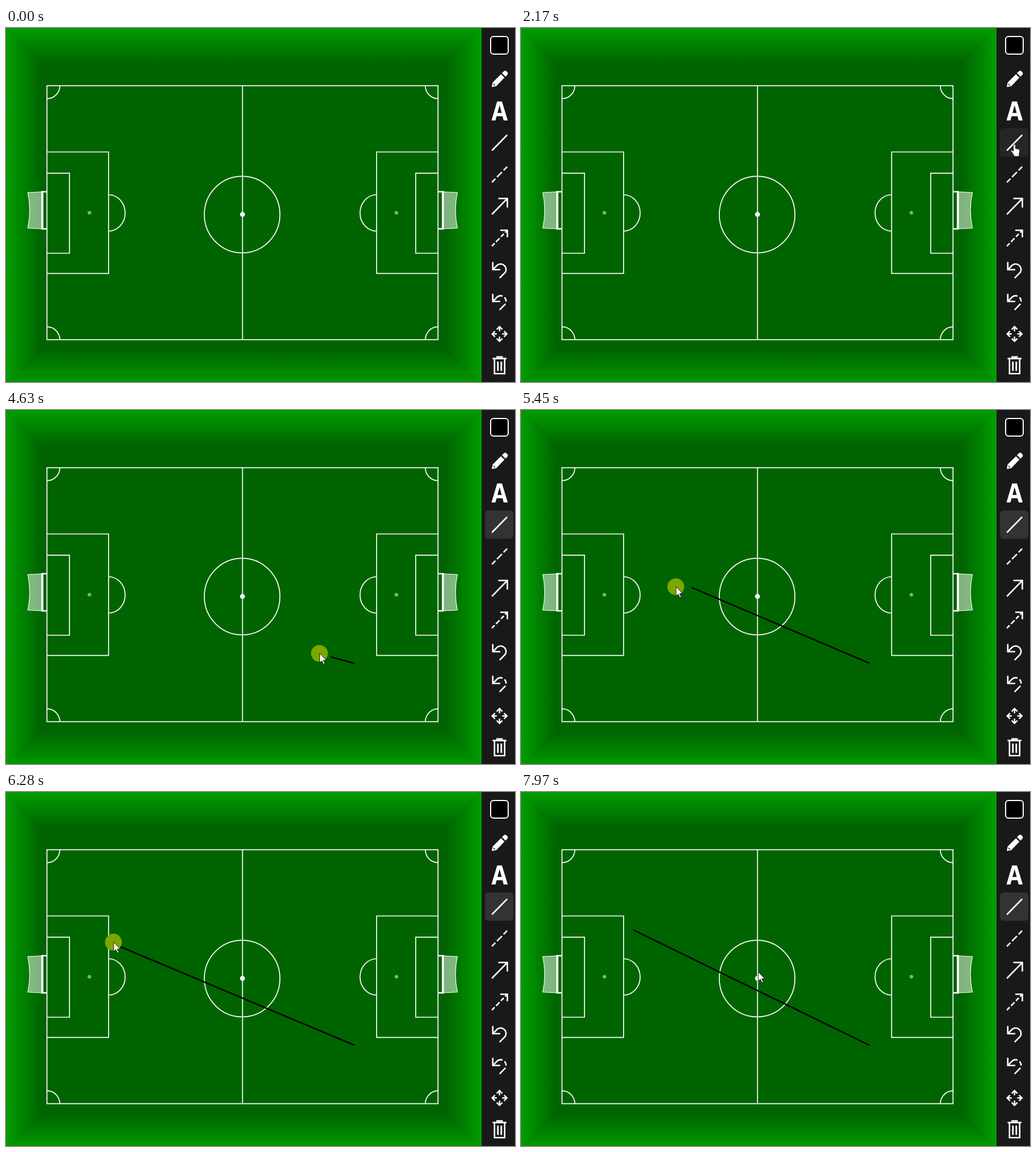
Animation of 898 by 624 pixels, one loop 8000 ms. Source, as an HTML page:

```html
<!DOCTYPE html>
<html lang="en">
<head>
<meta charset="utf-8">
<title>Tactics board</title>
<style>
  html, body { margin: 0; width: 100%; height: 100%; overflow: hidden; background: #1a191a; }
  svg { display: block; width: 898px; height: 624px; }
  .pitch { fill: none; stroke: #fff; stroke-width: 1.7; }
  .icons { fill: none; stroke: #fff; stroke-width: 2.6; }
  .solid { fill: #fff; stroke: none; }
</style>
</head>
<body>
<svg viewBox="0 0 898 624">
  <defs>
    <linearGradient id="fade" x2="0" y2="1">
      <stop stop-color="#009e00"/>
      <stop offset="1" stop-color="#006400"/>
    </linearGradient>
  </defs>
  <rect width="839" height="624" fill="#006400"/>
  <g fill="url(#fade)">
    <path id="long" d="M0 0H839L777 62H62Z"/>
    <use href="#long" transform="translate(0 630) scale(1 -1)"/>
    <path id="short" d="M0 0H630L568 62H62Z" transform="matrix(0 1 1 0 0 0)"/>
    <use href="#short" transform="translate(839 0) scale(-1 1)"/>
  </g>
  <rect x="839" width="59" height="624" fill="#1a191a"/>

  <g class="pitch">
    <rect x="72.3" y="101.7" width="689.9" height="447.7"/>
    <path d="M417.3 101.7V549.4"/>
    <ellipse cx="416.6" cy="328.8" rx="66.7" ry="67.5"/>
    <circle class="solid" cx="417.2" cy="328.6" r="4.3"/>
    <g id="half">
      <path d="M72.3 218.5H181V432.7H72.3M72.3 255.9H112V397H72.3"/>
      <path d="M181 294A29.2 32 0 0 1 181 358"/>
      <path d="M95 101.7A22.8 23 0 0 1 72.3 124.7M72.3 526.7A22.8 23 0 0 1 95 549.4"/>
      <path d="M38.4 290L63 288.8V354L38.4 352.8Q45.2 321 38.4 290Z"
            fill="#fff" fill-opacity=".5" stroke-width="1.1"/>
      <path d="M72.3 288.6H64V354H72.3" stroke-width="2.4"/>
      <path d="M64.2 287.4V355.2" stroke-width="3.4"/>
    </g>
    <use href="#half" transform="translate(834.8 0) scale(-1 1)"/>
    <g class="solid" opacity=".5">
      <circle cx="147.2" cy="325.6" r="3.2"/>
      <circle cx="688.7" cy="325.6" r="3.2"/>
    </g>
  </g>

  <rect id="button" x="845" width="50" height="50" rx="6"/>

  <g class="icons">
    <rect x="855" y="15" width="31" height="31" rx="5" fill="#000" stroke-width="2"/>
    <path class="solid" d="M857 104L858.6 96L873.2 81.4L879.4 87.6L865 102.4ZM875 79.6L878.4 76.2Q880.6 74.2 882.6 76L884.8 78.200Q886.4 80.200 884.600 82.400L881.2 85.800Z"/>
    <path d="M860 98.500L862.700 101.200" stroke="#1a191a" stroke-width="1.4"/>
    <path class="solid" fill-rule="evenodd" d="M856.500 163L866.500 129.500H875L885.200 163H878L876 155.600H865.500L863.500 163ZM867.100 149.800H874.500L870.800 136Z"/>
    <path d="M857.200 216L884.200 188.500"/>
    <path d="M857.200 272L884.200 244.500" stroke-dasharray="9 4 12.500 4"/>
    <path d="M857.200 328.500L884.500 300.500M868.500 300.500H884.500V316.500"/>
    <path d="M857.200 384.500L884 357" stroke-dasharray="7 3.500 9 3.500"/>
    <path d="M872 356.500H884.500V369"/>
    <g id="undo">
      <path d="M858.800 412.500V426H872"/>
    </g>
    <use href="#undo" y="56"/>
    <path id="bend" d="M859.500 425.300L867 417.800A9.600 9.600 0 0 1 880.400 431.200L870.800 440.800"/>
    <path d="M859.500 481.300L867 473.800A9.600 9.600 0 0 1 880.400 487.200L870.800 496.800" stroke-dasharray="20 4 8 4"/>
    <path id="arm" d="M870.700 534.500V527M865.700 531.300L870.700 526.300L875.700 531.300" stroke-width="2.500"/>
    <use href="#arm" transform="rotate(90 870.700 539.300)"/>
    <use href="#arm" transform="rotate(180 870.700 539.300)"/>
    <use href="#arm" transform="rotate(270 870.700 539.300)"/>
    <path d="M858.500 582.600H883M865 579.800H876.500M861.800 583V609.300H879.800V583"/>
    <path d="M867.800 588V604.500M873.800 588V604.500" stroke-width="2.800"/>
  </g>

  <line id="drawn" x1="615" y1="446.500" stroke="#000" stroke-width="2.500"/>
  <circle id="press" r="14.800" fill="#7ca700"/>
  <path id="arrow" d="M0 0V16.500L3.800 13L6.500 19.200L9 18.100L6.300 12.100H11.400Z"
        fill="#fff" stroke="#111" stroke-width=".9"/>
  <path id="hand" d="M-2 1.500Q0-1.800 2 1.500V7.200L8 8.800Q9.700 9.400 9.500 12L8.300 17.500V21.500H-.800V19.200L-5.800 12.500Q-6.500 9.800-4 10.300L-2 12.300Z"
        fill="#fff" stroke="#111"/>
</svg>
<script>
const LOOP = 8000, TICK = 70;
const SELECT = 2570, PRESS = 4230, DRAG = 4490, DROP = 6790, RELEASE = 7120;
const DROP_POINT = [198, 243];

const linear = s => s;
const smooth = s => s * s * (3 - 2 * s);
const easeOut = s => 1 - (1 - s) ** 3;

// Each stroke bends from the end of the one before, pulled by `via`.
const strokes = [
  { from: 1480, until: 2170, count: 10, via: [832, 142], to: [870.5, 205], ease: smooth },
  { from: 2570, until: 3340, count: 12, via: [768, 370], to: [627.5, 434], ease: smooth },
  { from: 3410, until: 3620, count: 4, via: [621, 440], to: [615.5, 446.5], ease: easeOut },
  { from: DRAG, until: 5050, count: 9, via: [513, 423], to: [467.5, 383], ease: linear },
  { from: 5310, until: 5590, count: 5, via: [348, 305], to: [262.5, 312], ease: easeOut },
  { from: 5790, until: 6580, count: 12, via: [165, 265.5], to: [197, 252], ease: linear },
  { from: 6650, until: DROP, count: 3, via: [198, 248], to: [199, 245], ease: easeOut },
  { from: 7580, until: 7970, count: 7, via: [309, 281], to: [418.5, 317], ease: smooth }
];

const bend = (a, b, c, u) =>
  a.map((v, k) => v * (1 - u) ** 2 + 2 * b[k] * u * (1 - u) + c[k] * u * u);

const steps = [];
let start = [898, 300];
for (const { from, until, count, via, to, ease } of strokes) {
  for (let i = 1; i <= count; i++) {
    const t = i === count ? until : from + TICK * (i - 1);
    steps.push({ t, at: bend(start, via, to, ease(i / count)) });
  }
  start = to;
}

const [button, drawn, press, arrow, hand] =
  ['button', 'drawn', 'press', 'arrow', 'hand'].map(id => document.getElementById(id));
const show = (node, on) => node.setAttribute('visibility', on ? 'visible' : 'hidden');
const set = (node, attrs) => {
  for (const k in attrs) node.setAttribute(k, attrs[k]);
};

const BUTTON_TOP = 177, BUTTON_GAP = 56;
function buttonAt([x, y]) {
  const row = Math.floor((y - BUTTON_TOP) / BUTTON_GAP);
  const inside = x >= 845 && x <= 895 && y - BUTTON_TOP - row * BUTTON_GAP <= 50;
  return inside ? row : -1;
}

function draw(t) {
  const i = steps.findLastIndex(s => s.t <= t);
  const visible = i >= 0;
  const at = visible ? steps[i].at : start;
  const row = visible ? buttonAt(at) : -1;
  const selected = t >= SELECT;

  show(button, selected || row >= 0);
  set(button, {
    y: BUTTON_TOP + (selected ? 0 : row * BUTTON_GAP),
    fill: selected ? '#343334' : '#272627'
  });

  show(arrow, visible && row < 0);
  show(hand, row >= 0);
  set(arrow, { transform: `translate(${at})` });
  set(hand, { transform: `translate(${at})` });

  show(press, t >= PRESS && t < RELEASE);
  set(press, { cx: at[0] - 0.5, cy: at[1] });

  // The line trails the pointer by one step until it is dropped.
  const [x2, y2] = t >= DROP ? DROP_POINT : steps[Math.max(0, i - 1)].at;
  show(drawn, t >= DRAG);
  set(drawn, { x2, y2 });
}

const began = performance.now();
function frame() {
  draw((performance.now() - began) % LOOP);
  requestAnimationFrame(frame);
}
frame();
</script>
</body>
</html>
```
